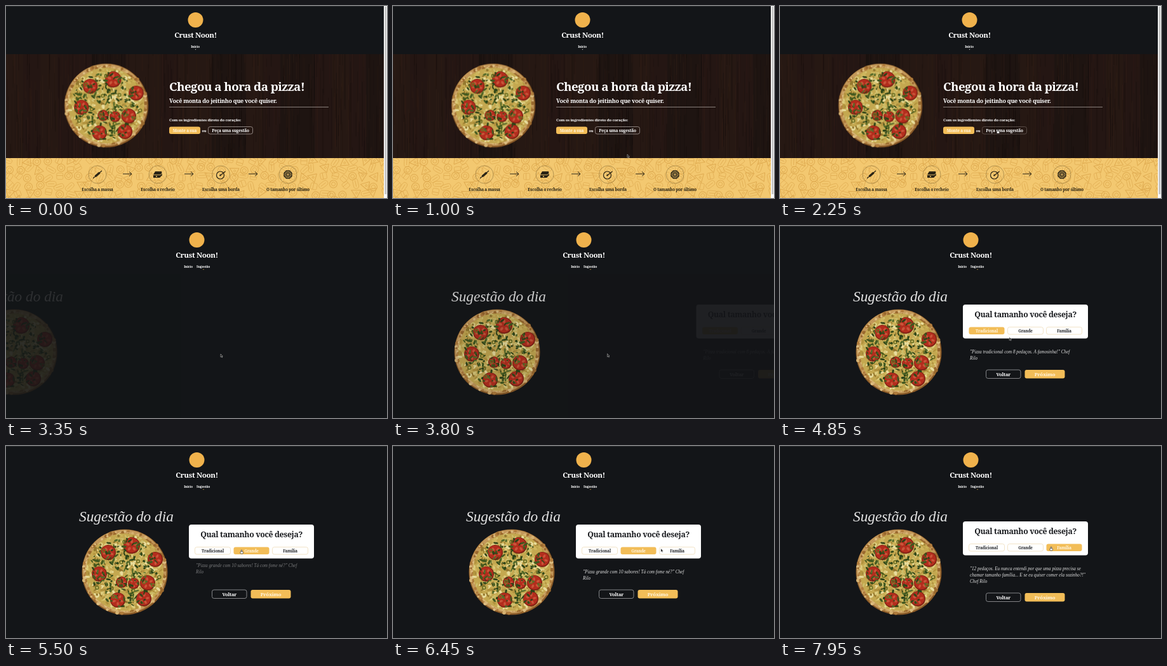
Recreate the animation shown at these times as an HTML page with a canvas. Size 600 px wide and 303 px high, loop 8000 ms.

```html
<!DOCTYPE html>
<html lang="pt">
<head>
<meta charset="utf-8">
<style>
html, body { margin: 0; width: 100%; height: 100%; overflow: hidden; background: #131518; }
canvas { display: block; width: 600px; height: 303px; }
</style>
</head>
<body>
<canvas id="stage" width="600" height="303"></canvas>
<script>
const LOOP = 8000, BG = '#131518', AMBER = '#f2bd58', TAU = Math.PI * 2;
const SLAB = '"Noto Serif", serif', SCRIPT = '"Liberation Serif", cursive';
const stage = document.getElementById('stage').getContext('2d');
let c = stage, seed = 1;

const rnd = (a = 1, b = 0) => {
  seed = (seed * 1664525 + 1013904223) >>> 0;
  return b + (a - b) * seed / 4294967296;
};
const pick = list => list[Math.floor(rnd(list.length))];
const ease = p => { p = Math.min(1, Math.max(0, p)); return p * p * (3 - 2 * p); };

// Runs a drawing once and keeps it as a bitmap.
function layer(w, h, draw) {
  const cv = document.createElement('canvas');
  cv.width = w; cv.height = h;
  c = cv.getContext('2d');
  draw();
  c = stage;
  return cv;
}
function rect(x, y, w, h, fill) {
  c.fillStyle = fill;
  c.fillRect(x, y, w, h);
}
function ellipse(x, y, rx, ry, angle, fill) {
  c.fillStyle = fill;
  c.beginPath();
  c.ellipse(x, y, rx, ry, angle, 0, TAU);
  c.fill();
}
const disc = (x, y, r, fill) => ellipse(x, y, r, r, 0, fill);
function ring(x, y, r, color, width) {
  c.strokeStyle = color; c.lineWidth = width;
  c.beginPath(); c.arc(x, y, r, 0, TAU); c.stroke();
}
function line(color, width, ...p) {
  c.strokeStyle = color; c.lineWidth = width;
  c.beginPath();
  for (let i = 0; i < p.length; i += 2) c.lineTo(p[i], p[i + 1]);
  c.stroke();
}
function box(x, y, w, h, r, fill, stroke) {
  c.beginPath(); c.roundRect(x, y, w, h, r);
  if (fill) { c.fillStyle = fill; c.fill(); }
  if (stroke) { c.strokeStyle = stroke; c.lineWidth = .7; c.stroke(); }
}
function text(s, x, y, size, { color = '#fff', weight = 600, align = 'left' } = {}) {
  c.font = `${weight} ${size}px ${SLAB}`;
  c.letterSpacing = -.03 * size + 'px';
  c.textAlign = align; c.fillStyle = color;
  c.fillText(s, x, y);
}
function script(s, x, y, size) {
  c.font = `italic ${size}px ${SCRIPT}`;
  c.letterSpacing = '0px';
  c.textAlign = 'left'; c.fillStyle = '#e4e4e4';
  c.fillText(s, x, y);
}
function button(s, x, y, w, h, size, look) {
  box(x, y, w, h, 3, look.fill, look.stroke);
  text(s, x + w / 2, y + h / 2 + size * .36, size, { color: look.color, align: 'center' });
}
const solid = { fill: AMBER, color: '#fff6e2' };

const pizza = layer(140, 140, () => {
  seed = 11;
  c.translate(70, 70);
  disc(0, 0, 67.5, '#8a5a28');
  disc(-.5, -1, 66, '#c3985a');
  for (let i = 0; i < 150; i++) {
    const a = rnd(TAU), r = rnd(65.5, 60);
    disc(r * Math.cos(a), r * Math.sin(a), rnd(3, 1), pick(['#d6b272', '#b07c3c', '#dcbd80', '#9a692e']));
  }
  disc(0, 0, 61, '#c4a850');
  for (let i = 0; i < 600; i++) {
    const a = rnd(TAU), r = 60 * Math.sqrt(rnd());
    ellipse(r * Math.cos(a), r * Math.sin(a), rnd(4, 1), rnd(2.4, .8), rnd(3),
      pick(['#dccb7c', '#e8dc9c', '#b3943f', '#cfb65c', '#94782f', '#cdbf6c']));
  }
  const tomatoes = [[11, -42, 13], [-26, -31, 12], [48, -20, 12], [-40, 3, 12], [36, 17, 12],
    [30, 42, 12], [-11, 44, 12], [-5, 16, 9], [14, 18, 9]];
  for (const [x, y, r] of tomatoes) {
    disc(x, y, r, '#7c2015');
    disc(x - .3, y - .5, r - 1.2, '#b32d1d');
    for (let i = 0; i < 5; i++) {
      const a = i * TAU / 5 + x;
      ellipse(x + r * .5 * Math.cos(a), y + r * .5 * Math.sin(a), r * .23, r * .15, a, '#c9553a');
    }
  }
  for (let i = 0; i < 16; i++) {
    const a = rnd(TAU), r = rnd(55, 15);
    ring(r * Math.cos(a), r * Math.sin(a), 2.4, '#6f7024', 1.7);
  }
  for (let i = 0; i < 190; i++) {
    const a = rnd(TAU), r = 55 * Math.sqrt(rnd());
    ellipse(r * Math.cos(a), r * Math.sin(a), rnd(4.2, 1.3), rnd(1.9, .7), rnd(3),
      pick(['#2c4318', '#43591f', '#35491a', '#566b2a']));
  }
});

const wood = layer(596, 164, () => {
  seed = 5;
  rect(0, 0, 596, 164, '#221613');
  for (let x = 0; x < 596; x += 27)
    rect(x, 0, 27, 164, pick(['rgba(66,36,27,.14)', 'rgba(10,7,7,.14)', 'rgba(48,28,22,.12)']));
  for (let i = 0; i < 500; i++)
    rect(rnd(596), rnd(150, -60), rnd(1.6, .5), rnd(120, 25), pick(['rgba(85,50,38,.12)', 'rgba(8,5,5,.16)']));
});

const doodles = layer(596, 63, () => {
  seed = 23;
  rect(0, 0, 596, 63, '#f3c870');
  const ink = '#dfab51';
  for (let y = 4; y < 70; y += 13) for (let x = 4; x < 600; x += 16) {
    c.save();
    c.translate(x + rnd(4, -4), y + rnd(3, -3));
    c.rotate(rnd(TAU));
    const kind = Math.floor(rnd(4));
    if (kind == 0) { ring(0, 0, 6, ink, 1); ring(0, 0, 3, ink, .8); }
    if (kind == 1) { line(ink, 1, -7, -5, 7, -5, 0, 8, -7, -5); ring(0, -1, 1.5, ink, .8); }
    if (kind == 2) { box(-8, -4, 16, 8, 4, null, ink); line(ink, .8, -5, 0, 5, 0); }
    if (kind == 3) { box(-5, -5, 10, 10, 2, null, ink); line(ink, .8, -5, -1, 5, -1); }
    c.restore();
  }
});

function stepIcon(i) {
  const ink = '#2a2415';
  if (i == 0) {
    line(ink, 1.2, -7, 6, 7, -6);
    line(ink, 3.4, -3.5, 3, 3.5, -3);
  } else if (i == 1) {
    c.fillStyle = ink;
    c.beginPath();
    [[-7, 0], [-4, -5], [6, -5], [7, 1], [3, 5], [-7, 5]].forEach(p => c.lineTo(...p));
    c.fill();
    line('#f3c870', .8, -7, .5, 4, .5, 7, -2);
    disc(-2, 3, 1, '#f3c870');
  } else if (i == 2) {
    ring(-1, 1, 6, ink, 1.2);
    line(ink, 1.3, -2, 2, 7, -5);
    disc(-1, 1, 1.2, ink);
  } else {
    disc(0, 0, 7, ink);
    for (let k = 0; k < 8; k++) {
      const a = k * TAU / 8;
      line('#f3c870', .6, 0, 0, 7 * Math.cos(a), 7 * Math.sin(a));
      disc(4.5 * Math.cos(a + .4), 4.5 * Math.sin(a + .4), .8, '#f3c870');
    }
  }
}

function home(hover) {
  c.drawImage(wood, 0, 76);
  c.drawImage(doodles, 0, 240);
  c.drawImage(pizza, 89.5, 88.5, 137, 137);
  text('Chegou a hora da pizza!', 257, 134, 18.8, { weight: 700 });
  text('Você monta do jeitinho que você quiser.', 257, 153, 9);
  rect(257, 159, 251, .7, '#b5aca8');
  text('Com os ingredientes direto do coração:', 257, 182, 6.1);
  button('Monte a sua', 257, 190.5, 49, 11.5, 6.5, solid);
  text('ou', 312, 198.5, 5.6, { weight: 700, align: 'center' });
  button('Peça uma sugestão', 318.5, 190.5, 70, 11.5, 6.5,
    { stroke: hover ? '#6d625c' : '#b9b1ad', color: '#fff' });
  [['Escolha a massa', 144], ['Escolha o recheio', 239], ['Escolha uma borda', 338.5], ['O tamanho por último', 444]]
    .forEach(([label, x], i) => {
      ring(x, 266, 14, '#8a7038', .6);
      c.save(); c.translate(x, 266); stepIcon(i); c.restore();
      text(label, x, 291.5, 6.4, { color: '#2a2415', align: 'center' });
    });
  for (const x of [184, 281, 382]) {
    line('#2a2415', 1, x, 265, x + 14, 265);
    line('#2a2415', 1, x + 10, 261.5, x + 14, 265, x + 10, 268.5);
  }
}

function header(isHome) {
  const x = isHome ? 298.5 : 300.5;
  rect(0, 0, 600, 1, '#2b2d30');
  disc(x, 22, 12, '#f0b24c');
  text('Crust Noon!', x, 50, 11.6, { align: 'center' });
  const nav = { align: 'center' };
  text('Inicio', isHome ? 298 : 287, 65.5, 5, nav);
  if (!isHome) text('Sugestão', 310.5, 65.5, 5, nav);
  disc(isHome ? 298.5 : 311, 68.6, .7, isHome ? '#ddd' : AMBER);
}

function scrollbar() {
  rect(595, 0, 5, 303, '#fafafa');
  rect(596.5, 1, 2.5, 296, '#c1c1c1');
}

const sizes = ['Tradicional', 'Grande', 'Família'];
const quotes = [
  ['"Pizza tradicional com 8 pedaços. A famosinha!" Chef', 'Rilo'],
  ['"Pizza grande com 10 sabores! Tá com fome né?" Chef', 'Rilo'],
  ['"12 pedaços. Eu nunca entendi por que uma pizza precisa se',
    'chamar tamanho família... E se eu quiser comer ela sozinho?!"', 'Chef Rilo']
];
const clicks = [3690, 5200, 6750];

function form(t) {
  const chosen = t < clicks[1] ? 0 : t < clicks[2] ? 1 : 2;
  const grow = chosen == 2 ? 5 : 0, top = 124 - grow;
  box(288, top, 197, 53.5, 4, '#fff');
  text('Qual tamanho você deseja?', 386.5, top + 19.5, 12.3, { color: '#1a1c20', weight: 700, align: 'center' });
  sizes.forEach((s, i) => button(s, 297.5 + 61 * i, top + 35.5, 56, 11.5, 6.3,
    i == chosen ? solid : { stroke: '#ecd9b0', color: '#24262a' }));
  const shown = chosen ? ease((t - clicks[chosen]) / 600) : 1;
  c.globalAlpha = shown;
  quotes[chosen].forEach((s, i) => script(s, 299, 200.5 - grow + 10 * i - 20 * (1 - shown), 7.2));
  c.globalAlpha = 1;
  button('Voltar', 324.5, 227 + grow, 54.5, 13.5, 7.7, { stroke: '#b4b4b6', color: '#fff' });
  button('Próximo', 385.5, 227 + grow, 63, 13.5, 7.8, solid);
}

// Slides content in by dx while a veil of the page colour lifts from its half.
function enter(p, dx, x, w, draw) {
  if (p <= 0) return;
  c.save();
  c.translate(dx * (1 - p), 0);
  draw();
  c.restore();
  c.globalAlpha = 1 - p;
  rect(x, 76, w, 227, BG);
  c.globalAlpha = 1;
}

// time, x, y
const path = [[200, 420, 312], [1500, 344, 196], [2650, 343, 196], [3300, 338, 202], [4400, 337, 201],
  [5100, 371, 165], [5700, 371, 165], [6300, 422, 162], [6450, 422, 162], [6700, 432, 162],
  [7800, 432, 162], [7900, 427, 160], [8001, 427, 160]];

function cursor(t) {
  const i = path.findIndex(p => p[0] > t);
  if (i < 1) return;
  const [t0, x0, y0] = path[i - 1], [t1, x1, y1] = path[i];
  const p = ease((t - t0) / (t1 - t0));
  const x = x0 + (x1 - x0) * p, y = y0 + (y1 - y0) * p;
  const hand = (t < 2650 && y < 202) || (t > 5000 && t < 6000) || t > 6600;
  c.save();
  c.translate(x, y);
  if (hand) {
    box(-.8, -1, 1.6, 4, .8, '#fff', '#333');
    box(-2, 1.6, 4.4, 3.4, 1.2, '#fff', '#333');
  } else {
    c.beginPath();
    [[0, 0], [0, 5], [1.2, 4], [2.2, 5.6], [2.9, 5.2], [2, 3.6], [3.3, 3.5]].forEach(q => c.lineTo(...q));
    c.closePath();
    c.fillStyle = '#111'; c.fill();
    c.strokeStyle = '#bbb'; c.lineWidth = .6; c.stroke();
  }
  c.restore();
}

function draw(t) {
  const isHome = t < 2650;
  rect(0, 0, 600, 303, BG);
  if (t < 3150) {
    home(t > 1450);
    c.globalAlpha = ease((t - 2650) / 500);
    rect(0, 76, 600, 227, BG);
    c.globalAlpha = 1;
  } else {
    enter(ease((t - 3170) / 800), -200, 0, 275, () => {
      script('Sugestão do dia', 115, 119, 23.3);
      c.drawImage(pizza, 117, 129);
    });
    enter(ease((t - clicks[0]) / 800), 200, 275, 325, () => form(t));
  }
  header(isHome);
  if (isHome) scrollbar();
  cursor(t);
}

const start = performance.now();
function tick() {
  draw((performance.now() - start) % LOOP);
  requestAnimationFrame(tick);
}
tick();
</script>
</body>
</html>
```
